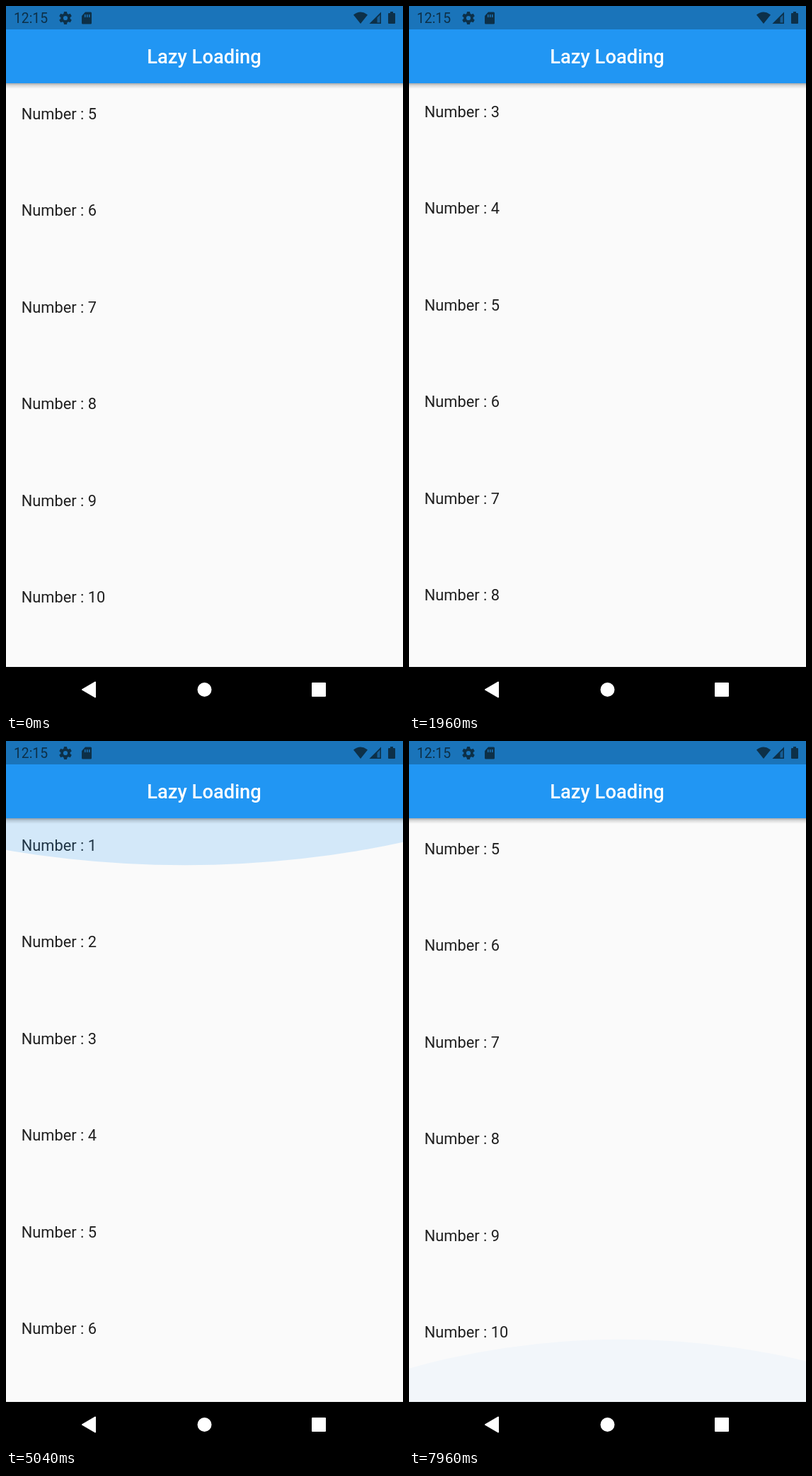
Write an HTML page that moves like this. It is 561 by 998 pixels and loops after 8 s.

```html
<!DOCTYPE html>
<html lang="en">
<head>
<meta charset="utf-8">
<title>Lazy Loading</title>
<style>
  html, body { margin: 0; width: 100%; height: 100%; overflow: hidden; background: #fafafa; }
  svg { display: block; font-family: Roboto, sans-serif; }
  #list { font-size: 21.8px; fill: #1f1f1f; }
  .status { fill: #0d3048; }
  .nav { fill: #fff; stroke: #fff; stroke-width: 2; stroke-linejoin: round; }
</style>
</head>
<body>
<svg width="561" height="998" viewBox="0 0 561 998">
  <defs>
    <linearGradient id="shade" x2="0" y2="1">
      <stop offset="0" stop-color="#000" stop-opacity=".32"/>
      <stop offset=".4" stop-color="#000" stop-opacity=".13"/>
      <stop offset="1" stop-color="#000" stop-opacity="0"/>
    </linearGradient>
  </defs>
  <rect width="561" height="998" fill="#fafafa"/>
  <g id="list"></g>
  <g fill="#2196f3">
    <ellipse id="topGlow" cx="252" rx="841.5"/>
    <ellipse id="bottomGlow" cx="300" rx="841.5"/>
  </g>

  <rect y="109" width="561" height="8" fill="url(#shade)"/>
  <rect width="561" height="109" fill="#2196f3"/>
  <rect width="561" height="33" fill="#1a74ba"/>
  <text x="280" y="81" font-size="27.3" font-weight="500" fill="#fff" text-anchor="middle">Lazy Loading</text>

  <g class="status">
    <text x="11" y="24" font-size="19.3">12:15</text>
    <g transform="translate(84 17)">
      <circle r="4.9" fill="none" stroke="#0d3048" stroke-width="3.6"/>
      <g id="teeth"></g>
    </g>
    <path fill-rule="evenodd" d="M112 8.5h7.5q1.5 0 1.5 1.5v14q0 1.5-1.5 1.5h-11q-1.500 0-1.500-1.500v-10zM111 12v4h1.500v-4zm3 0v4h1.500v-4zm3 0v4h1.500v-4z"/>
    <path d="M491 12.500q10-8 20 0l-10 12.500z"/>
    <path d="M530 8.500v16.500h-16.500z" fill-opacity=".3"/>
    <path fill-rule="evenodd" d="M530 8.500v16.500h-16.500zM528.500 12.500l-4 4v7h4z"/>
    <path d="M540 11q0-1 1-1h2v-2h4v2h2q1 0 1 1v13q0 1-1 1h-8q-1 0-1-1z"/>
  </g>

  <rect y="933" width="561" height="65"/>
  <g class="nav">
    <path d="M108 965l18-10.500v21z"/>
    <circle cx="280.500" cy="965" r="9"/>
    <rect x="433" y="956" width="18" height="18"/>
  </g>
</svg>
<script>
const LOOP = 8000, ROW = 136.45, FIRST_BASELINE = 155;
const TOP = 109, BOTTOM = 933, RADIUS = 841.5, GLOW_HEIGHT = 119.3;
const $ = id => document.getElementById(id);
const clamp = x => Math.min(1, Math.max(0, x));
const progress = (t, start, end) => clamp((t - start) / (end - start));

const smooth = u => u * u * (3 - 2 * u);
const decelerate = u => 1 - (1 - u) ** 2;
const accelerate = u => u ** 2.5;

// Each gesture: start ms, end ms, scroll offset reached, easing
const START_SCROLL = 540.8;
const gestures = [
  [1000, 2000, 269.9, smooth],
  [2250, 3540, 240.1, decelerate],
  [4200, 4733, 0, accelerate],
  [5600, 6290, 449.3, smooth],
  [7500, 7820, 540.8, smooth]
];

const rows = Array.from({ length: 10 }, (_, i) =>
  `<text x="21.8" y="${FIRST_BASELINE + i * ROW}">Number : ${i + 1}</text>`);
$('list').innerHTML = rows.join('');
$('teeth').innerHTML = [0, 60, 120, 180, 240, 300].map(a =>
  `<path d="M-2.600-5.500l.6-3.500h4l.6 3.500z" transform="rotate(${a})"/>`).join('');

function scrollAt(t) {
  let offset = START_SCROLL;
  for (const [start, end, target, ease] of gestures)
    offset += (target - offset) * ease(progress(t, start, end));
  return offset;
}

// Overscroll glow: a circle squashed towards the list edge
function setGlow(el, edge, direction, size, opacity) {
  el.setAttribute('cy', edge - direction * (RADIUS - GLOW_HEIGHT) * size);
  el.setAttribute('ry', RADIUS * size);
  el.setAttribute('opacity', size > 0 ? opacity : 0);
}

function draw(t) {
  $('list').setAttribute('transform', `translate(0 ${-scrollAt(t)})`);

  const grow = decelerate(progress(t, 4733, 4905));
  const fade = 1 - decelerate(progress(t, 4905, 5505));
  setGlow($('topGlow'), TOP, 1, 0.93 * grow * fade, 0.3 * fade);

  const pull = decelerate(progress(t, 7800, 7960));
  setGlow($('bottomGlow'), BOTTOM, -1, 0.74 * pull, 0.035 * pull);
}

function tick() {
  draw(performance.now() % LOOP);
  requestAnimationFrame(tick);
}
tick();
</script>
</body>
</html>
```
